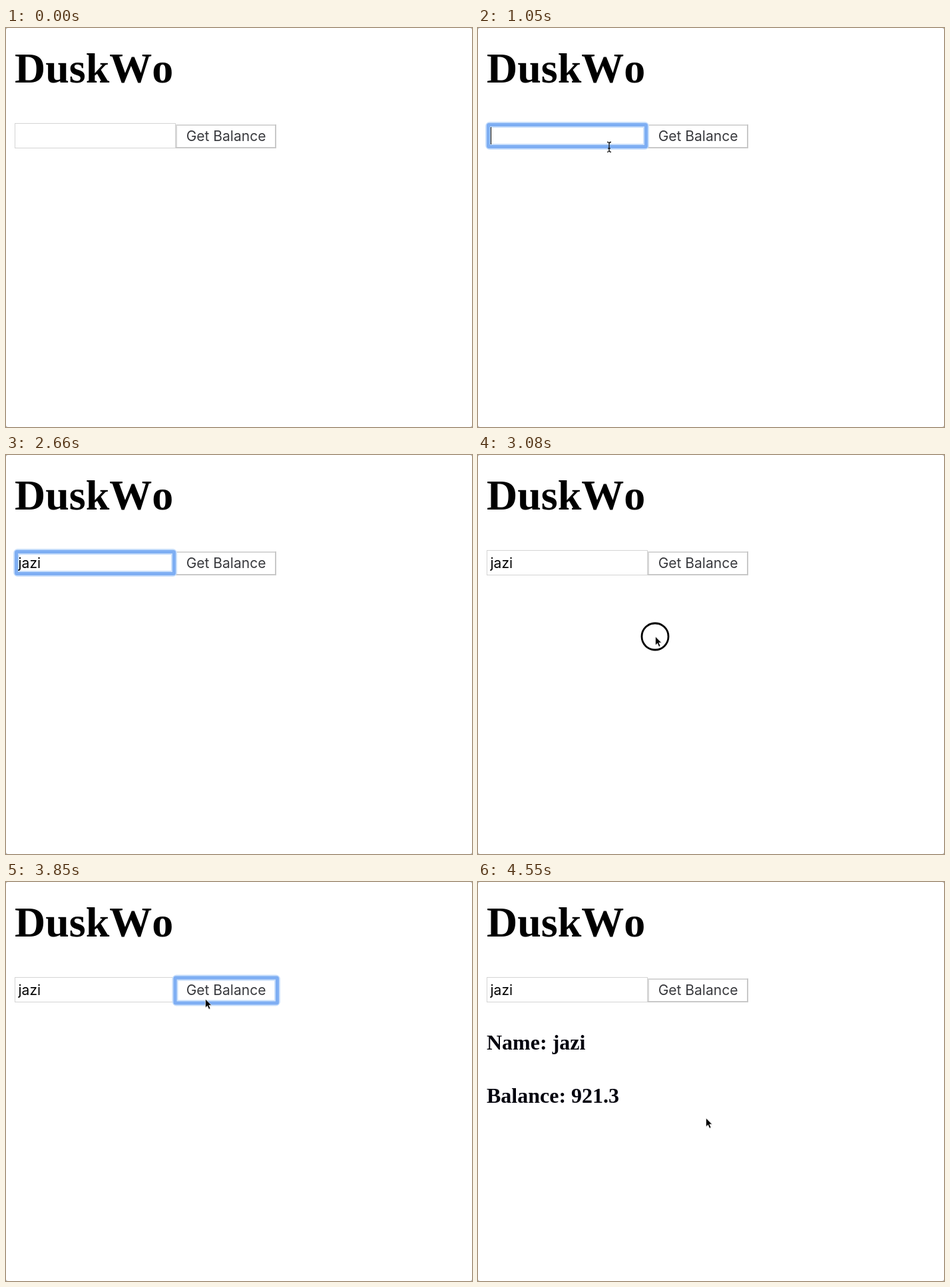
An HTML page that plays this animation: 700 by 600 pixels, repeating every 4900 ms.

```html
<!DOCTYPE html>
<html lang="en">
<head>
<meta charset="utf-8">
<title>Balance form</title>
<style>
  html, body { margin: 0; width: 100%; height: 100%; overflow: hidden; background: #aaa; }
  svg { display: block; width: 700px; height: 600px; }
  .serif { font: bold 32px "Liberation Serif", Times, serif; font-kerning: none; fill: #04040e; }
  .serif.title { font-size: 64px; fill: #000; }
  .ui { font: 21px Inter, Roboto, sans-serif; }
  .glow rect { fill: none; stroke: #c9dffb; stroke-width: 9; }
  .glow rect + rect { stroke: #7eaef3; stroke-width: 5; }
</style>
</head>
<body>
<svg viewBox="0 0 700 600">
  <rect width="700" height="600" rx="3" fill="#fff"/>
  <text class="serif title" x="13" y="82">DuskWo</text>

  <rect x="13.5" y="143.5" width="241" height="37" fill="#fff" stroke="#d4d4d4"/>
  <g fill="none" stroke-width="2">
    <path d="M256 181V146H406" stroke="#d6d6d6"/>
    <path d="M255 180H405V145" stroke="#c8c8c8"/>
  </g>

  <g id="inputGlow" class="glow">
    <rect x="15.5" y="145.5" width="237" height="33" rx="2"/>
    <rect x="15.5" y="145.5" width="237" height="33" rx="1"/>
  </g>
  <g id="buttonGlow" class="glow">
    <rect x="254" y="144" width="153.5" height="38" rx="2"/>
    <rect x="254" y="144" width="153.5" height="38" rx="1"/>
  </g>

  <text class="ui" x="330.5" y="170" text-anchor="middle" fill="#38393d">Get Balance</text>
  <text class="ui" id="typed" x="18.5" y="170"></text>
  <path id="caret" d="M0 149V175" stroke="#000"/>

  <g id="result" class="serif">
    <text x="13" y="252">Name: jazi</text>
    <text x="13" y="332">Balance: 921.3</text>
  </g>

  <g id="pointer">
    <circle id="ring" r="20" fill="none" stroke="#000" stroke-width="2.8"/>
    <g id="arrow">
      <path d="M1 1.5V13.5L4 11L6.3 16.1L8.6 15.1L6.4 10.2H10Z" fill="#000" opacity=".15"/>
      <path d="M.5 0V13L3.5 10.2L5.7 15.3L8 14.3L5.8 9.3H9.7Z" fill="#000" stroke="#fff" stroke-width=".7"/>
    </g>
    <path id="beam" d="M-3 -5.5Q0 -5.5 0 -3Q0 -5.5 3 -5.5M0 -3V7M-3 9.5Q0 9.5 0 7Q0 9.5 3 9.5M-1.8 4H1.8" fill="none" stroke="#111" stroke-width="1.3"/>
  </g>
</svg>
<script>
const LOOP = 4900, STEP = 70;
const NAME = "jazi", KEY_TIMES = [1820, 1960, 2100, 2170];

// Pointer moves: start, end, from x, y, to x, y
const MOVES = [
  [350, 840, 660, 337, 200, 180],
  [840, 910, 200, 180, 197, 177],
  [2800, 3010, 200, 186, 266, 273],
  [3220, 3710, 266, 273, 299, 176],
  [3850, 4340, 299, 176, 342, 355]
];

const el = Object.fromEntries([...document.querySelectorAll("[id]")].map(e => [e.id, e]));
const show = (id, on) => el[id].setAttribute("visibility", on ? "inherit" : "hidden");
const within = (t, ...spans) => spans.some(([a, b]) => t >= a && t < b);
const ease = p => 0.6 * p + 0.4 * p * p * (3 - 2 * p);

function pointerAt(t) {
  const [start, end, x0, y0, x1, y1] = MOVES.filter(m => m[0] <= t).pop() || MOVES[0];
  const p = ease(Math.min(1, Math.max(0, (t - start) / (end - start))));
  return [x0 + (x1 - x0) * p, y0 + (y1 - y0) * p];
}

function draw(now) {
  const t = Math.floor(now % LOOP / STEP) * STEP;

  el.typed.textContent = NAME.slice(0, KEY_TIMES.filter(k => k <= t).length);
  const caretX = Math.round(18.5 + el.typed.getComputedTextLength()) + 0.5;
  el.caret.setAttribute("transform", `translate(${caretX})`);
  show("caret", within(t, [980, 1540], [1820, 2660]));

  show("inputGlow", within(t, [980, 3080]));
  show("buttonGlow", within(t, [3780, 4480]));
  show("result", t >= 3920);

  const beam = within(t, [910, 1820]);
  el.pointer.setAttribute("transform", `translate(${pointerAt(t)})`);
  show("pointer", within(t, [350, 1820], [2800, LOOP]));
  show("beam", beam);
  show("arrow", !beam);
  show("ring", within(t, [980, 1050], [3080, 3150], [3780, 3850], [4480, 4550]));

  requestAnimationFrame(draw);
}
requestAnimationFrame(draw);
</script>
</body>
</html>
```
